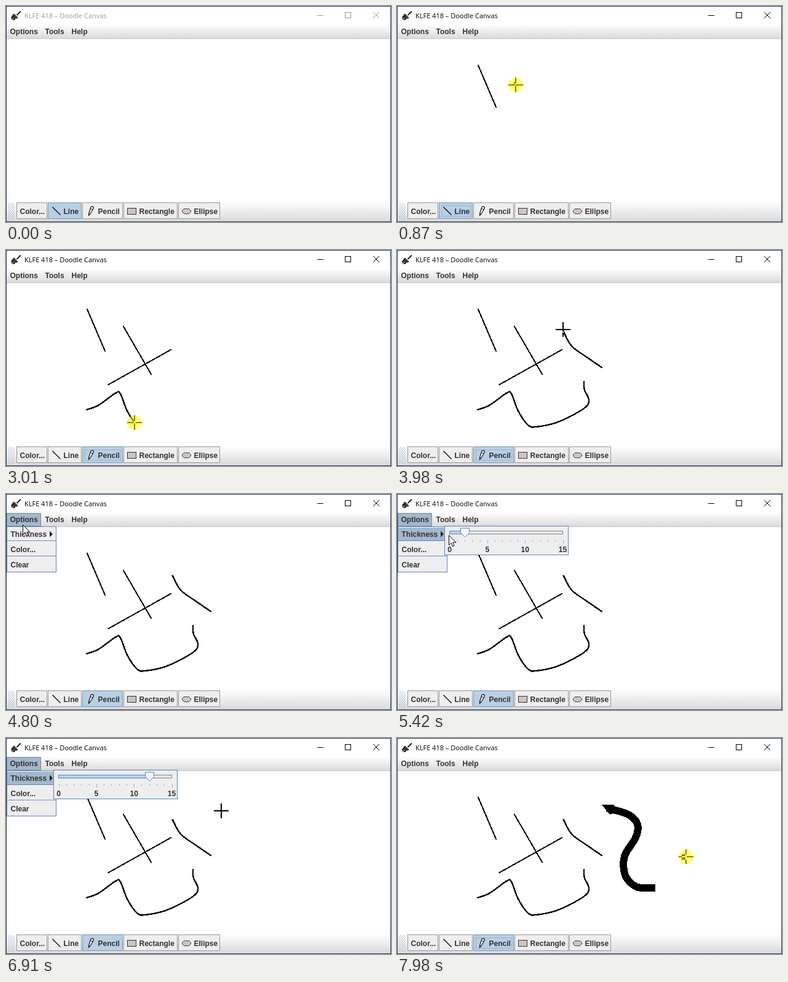
Write an HTML page that moves like this. It is 626 px wide and 353 px high and loops after 8 s.

```html
<!DOCTYPE html>
<html lang="en">
<head>
<meta charset="utf-8">
<title>Drawing window</title>
<style>
html, body { margin: 0; width: 100%; height: 100%; overflow: hidden; background: #fff; }
svg { display: block; width: 626px; height: 353px; }
.ui { font: bold 12px "Liberation Sans", Arial, sans-serif; fill: #333; }
.title { font: 11px "Open Sans", "Noto Sans", sans-serif; }
.ink { fill: none; stroke: #000; stroke-linecap: square; shape-rendering: crispEdges; }
.crisp { shape-rendering: crispEdges; }
#cross { mix-blend-mode: difference; fill: #fff; }
</style>
</head>
<body>
<svg viewBox="0 0 626 353" xmlns="http://www.w3.org/2000/svg">
  <defs>
    <linearGradient id="bar" x2="0" y2="1">
      <stop offset="0" stop-color="#fff"/><stop offset="1" stop-color="#dadada"/>
    </linearGradient>
    <pattern id="grip" width="4" height="4" patternUnits="userSpaceOnUse">
      <path d="M0 0h1v1h-1zM2 2h1v1h-1z" fill="#8fa9c3"/>
      <path d="M1 1h1v1h-1zM3 3h1v1h-1z" fill="#c5d8ea"/>
    </pattern>
  </defs>
  <rect width="626" height="353" fill="#fff"/>

  <g id="caption">
    <text class="title" x="30" y="20">KLFE 418 – Doodle Canvas</text>
    <g fill="none" stroke="currentColor">
      <path class="crisp" d="M506 15.5h10M551.5 10.5h9v9h-9z"/>
      <path d="M597 10l10 10M607 10l-10 10"/>
    </g>
  </g>
  <path d="M24 8.5L17.500 15" stroke="#222" stroke-width="2"/>
  <path d="M13 13l6 6-2 1.500-6-6z" fill="#6b4b45" stroke="#111"/>
  <path d="M12 15l-3.500 4M14 17l-5 5M16 19l-3.500 4M13 16l-4.500 4M15 18l-4 5" stroke="#111" stroke-width="1.200"/>

  <rect x="1" y="30" width="624" height="23" fill="url(#bar)"/>
  <path class="crisp" d="M1 53.5h624" stroke="#ccc"/>
  <rect id="optionsLit" class="crisp" x="1.5" y="31.5" width="55" height="21" fill="#a3b8cc" stroke="#7a8a99"/>
  <g class="ui">
    <text x="6.5" y="46">Options</text><text x="63.5" y="46">Tools</text><text x="106.5" y="46">Help</text>
  </g>

  <rect x="1" y="320" width="624" height="32" fill="url(#bar)"/>
  <rect class="crisp" x="3" y="322" width="11" height="27" fill="url(#grip)"/>
  <g id="buttons" class="ui"></g>
  <path d="M75.5 328.500l13 13" stroke="#111" stroke-width="1.400"/>
  <path d="M135 338l3-9.500 2.500-1 2 1.500-.5 2-4.500 8-3 3z" fill="#fff" stroke="#111" stroke-width="1.200"/>
  <path d="M137.500 331l4 2M134 339l1.500 2.500" stroke="#111"/>
  <rect class="crisp" x="197.5" y="330.5" width="14" height="10" fill="#cdc5c5" stroke="#333"/>
  <ellipse class="crisp" cx="293.5" cy="335.5" rx="7" ry="4.500" fill="#cdc5c5" stroke="#444"/>

  <g id="drawing"></g>

  <g id="menu" class="ui">
    <rect class="crisp" x="1.5" y="53.5" width="80" height="74" fill="#eee" stroke="#6382bf"/>
    <rect id="thickLit" x="2" y="55" width="79" height="21" fill="#a3b8cc"/>
    <path d="M71 60.500v10l5-5z" fill="#222"/>
  </g>

  <g id="slider" class="ui">
    <rect class="crisp" x="77.5" y="52.5" width="201" height="47" fill="#eee" stroke="#6382bf"/>
    <rect class="crisp" x="85.5" y="60.5" width="184" height="5" fill="#e6e6e6" stroke="#7a8a99"/>
    <rect id="fill" class="crisp" x="85.5" y="60.5" height="5" fill="#bdd2ea" stroke="#6382bf"/>
    <g id="scale" text-anchor="middle"></g>
    <path id="thumb" d="M-7 56h14v7.500l-7 7-7-7z" fill="#f4f8fc" stroke="#6382bf" stroke-linejoin="round"/>
  </g>

  <path id="cross" class="crisp" d="M-12-1h11v-11h2v11h11v2h-11v11h-2v-11h-11z"/>
  <path id="arrow" d="M.5.5v16l3.700-3.500 2.500 5.700 2.500-1.100-2.500-5.500h5.200z" fill="#fff" stroke="#000"/>
  <circle id="halo" r="12" fill="#ff0" fill-opacity=".53"/>

  <rect class="crisp" x=".5" y=".5" width="625" height="352" fill="none" stroke="#1f3f63"/>
</svg>

<script>
const LOOP = 8000, LINE = 1, PENCIL = 2;
const MENU_OPEN = 4610, SLIDER_OPEN = 5200, MENU_SHUT = 6960;
const GRAB = 5990, DROP = 6390;
const TICK0 = 86, STEP = 184 / 15;

const $ = id => document.getElementById(id);
const clamp = (v, a = 0, b = 1) => Math.max(a, Math.min(b, v));
const ease = u => u * u * (3 - 2 * u);
const show = (el, on) => el.setAttribute("display", on ? "inline" : "none");
const place = (el, x, y) => el.setAttribute("transform", `translate(${x} ${y})`);

function add(parent, tag, attrs, text) {
  const el = document.createElementNS("http://www.w3.org/2000/svg", tag);
  for (const k in attrs) el.setAttribute(k, attrs[k]);
  if (text) el.textContent = text;
  parent.append(el);
  return el;
}

// Toolbar buttons sit side by side, one pixel apart
let left = 17;
const buttons = Object.entries({ "Color...": 50, Line: 55, Pencil: 66, Rectangle: 88, Ellipse: 68 })
  .map(([label, w], i) => {
    const g = $("buttons");
    const face = add(g, "rect", { x: left + .5, y: 321.5, width: w - 1, height: 26, class: "crisp" });
    const ring = add(g, "rect", { x: left + 4.5, y: 326.5, width: w - 8, height: 17, fill: "none", stroke: "#99b5d3", class: "crisp" });
    add(g, "text", { x: left + (i ? 25.5 : 5.5), y: 340 }, label);
    left += w + 1;
    return { face, ring };
  });

["Thickness", "Color...", "Clear"].forEach((label, i) => {
  const y = 53.5 + 25 * i - (i ? 1 : 0);
  if (i) add($("menu"), "path", { d: `M2 ${y - 1}h79`, stroke: "#6382bf", class: "crisp" });
  add($("menu"), "path", { d: `M2 ${i ? y : y + 1}h79`, stroke: "#fff", class: "crisp" });
  add($("menu"), "text", { x: 7.5, y: 70 + 25 * i }, label);
});

for (let i = 0; i <= 15; i++) {
  const x = TICK0 + i * STEP, major = i % 5 === 0;
  add($("scale"), "path", { d: `M${Math.floor(x) + .5} 75v${major ? 6 : 3}`, stroke: "#a3b0bf", class: "crisp" });
  if (major) add($("scale"), "text", { x: x - .5, y: 95 }, String(i));
}

// Smooth curve through the points
function curve(pts) {
  const at = i => pts[clamp(i, 0, pts.length - 1)];
  let d = "M" + pts[0];
  for (let i = 0; i < pts.length - 1; i++) {
    const [p, a, b, q] = [-1, 0, 1, 2].map(k => at(i + k));
    const out = a.map((v, k) => v + (b[k] - p[k]) / 6);
    const into = b.map((v, k) => v - (q[k] - a[k]) / 6);
    d += `C${out} ${into} ${b}`;
  }
  return d;
}

// The pointer's script: each step runs from the end of the last one
const steps = [];
let now = 50, here = [105, 80];
function step(until, end, extra) {
  steps.push({ t0: now, t1: until, from: here, to: end, ...extra });
  now = until;
  here = end;
}
const glide = (until, x, y) => step(until, [x, y]);
const wait = until => step(until, here);
const press = until => step(until, here, { down: true });
const drag = (until, x, y) => step(until, [x, y], { down: true });
function draw(until, pts, width = 2) {
  const el = add($("drawing"), "path", { class: "ink", d: curve([here, ...pts]), "stroke-width": width });
  step(until, pts[pts.length - 1], { down: true, el, len: el.getTotalLength() });
}

glide(150, 132, 97);
press(200);
draw(480, [[161, 165]]);
glide(760, 191, 125);
press(860);
draw(1100, [[236, 203]]);
glide(1290, 268, 163);
press(1340);
draw(1620, [[166.5, 220]]);
press(1690);

glide(1870, 252, 178);
glide(2150, 152, 340);
press(2250);
glide(2460, 158, 299);
glide(2560, 131, 261);
press(2710);
draw(3400, [[150, 254], [178, 234], [186, 235], [197, 263], [213, 286], [226, 289], [262, 281],
  [304, 259], [312, 245], [305, 229], [304, 215]], 2.4);
wait(3530);
glide(3640, 333, 192);
draw(3930, [[307, 174], [284, 157], [271, 134]], 2.4);
glide(3980, 270, 130);

glide(4300, 131, 38);
glide(4560, 27, 38);
press(4660);
glide(4950, 27, 62);
wait(5170);
glide(5420, 84, 67);
glide(5700, 113, 62);
wait(5900);
press(GRAB);
drag(DROP, 237, 62);
glide(6760, 348, 125);
glide(6910, 350, 119);
glide(6950, 347, 116);
press(7010);
draw(7680, [[376, 125], [391, 141], [388, 163], [370, 193], [371, 224], [389, 243], [414, 245]], 12);
const tip = add($("drawing"), "path", { d: "M333 109h20v14l-7 2z", class: "crisp" });
glide(7840, 478, 216);
glide(7930, 470, 194);
press(LOOP);
const dot = add($("drawing"), "rect", { x: 463, y: 190, width: 8, height: 9, class: "crisp" });

function position(s, t) {
  const u = clamp((t - s.t0) / (s.t1 - s.t0));
  if (s.el) {
    const p = s.el.getPointAtLength(s.len * u);
    return [p.x, p.y];
  }
  return s.from.map((v, k) => v + (s.to[k] - v) * ease(u));
}

function render(t) {
  const active = t >= 50;
  const menu = t >= MENU_OPEN && t < MENU_SHUT;
  const slider = menu && t >= SLIDER_OPEN;
  const tool = t < 2200 ? LINE : PENCIL;

  $("caption").setAttribute("fill", active ? "#000" : "#999");
  $("caption").setAttribute("color", active ? "#000" : "#999");
  buttons.forEach(({ face, ring }, i) => {
    const on = i === tool;
    face.setAttribute("fill", on ? "#b8cfe5" : "#eee");
    face.setAttribute("stroke", on ? "#7f97b0" : "#999");
    show(ring, on && active && !menu);
  });

  for (const s of steps.filter(s => s.el)) {
    const u = clamp((t - s.t0) / (s.t1 - s.t0));
    show(s.el, u > 0);
    s.el.setAttribute("stroke-dasharray", u < 1 ? `${s.len * u} ${s.len * 2}` : "none");
  }
  show(tip, t >= 7010);
  show(dot, t >= 7940);

  show($("optionsLit"), menu);
  show($("menu"), menu);
  show($("thickLit"), t >= 4900);
  show($("slider"), slider);
  const value = 2 + 10 * ease(clamp((t - GRAB) / (DROP - GRAB)));
  const thumbX = TICK0 + value * STEP;
  place($("thumb"), Math.floor(thumbX) + .5, 0);
  $("fill").setAttribute("width", thumbX - 85.5);

  const s = steps.find(s => t < s.t1) || steps[steps.length - 1];
  const [x, y] = position(s, t).map(Math.round);
  const arrow = y < 54 || y > 320 || (menu && x < 82 && y < 128) || (slider && x < 280 && y < 101);
  show($("arrow"), active && arrow);
  show($("cross"), active && !arrow);
  show($("halo"), active && s.down);
  for (const id of ["arrow", "cross", "halo"]) place($(id), x, y);
}

function tick() {
  render(performance.now() % LOOP);
  requestAnimationFrame(tick);
}
tick();
</script>
</body>
</html>
```
